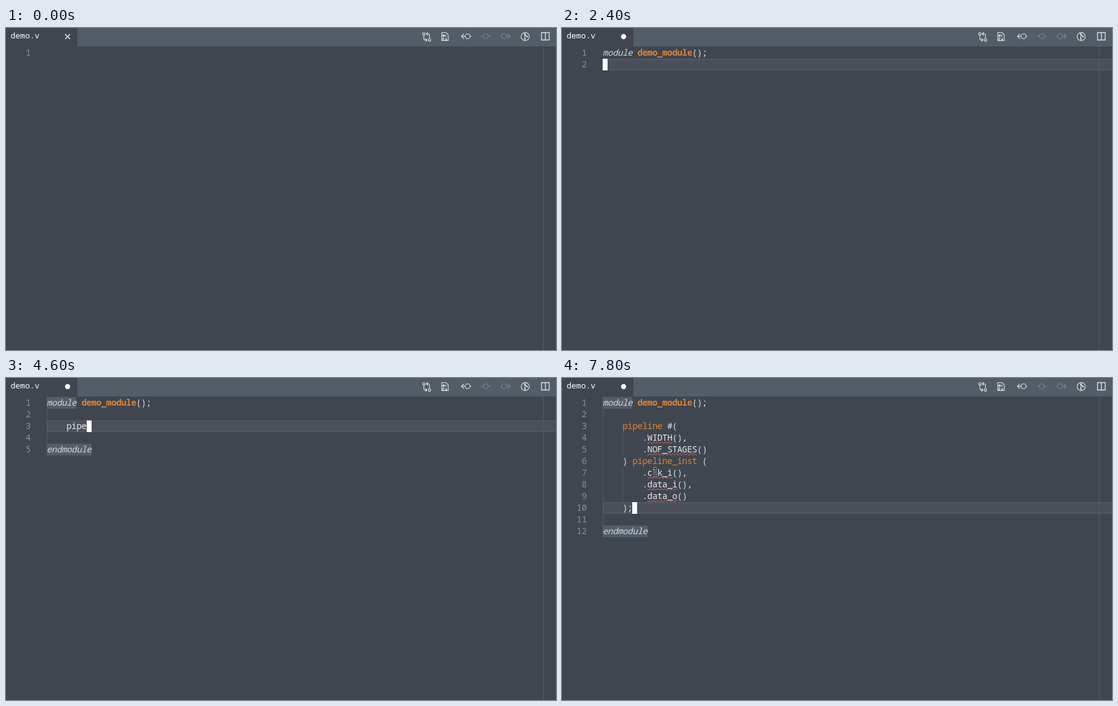
These frames come from a looping animation (893 px wide and 524 px high, 8 s). An HTML page:

```html
<!DOCTYPE html>
<html lang="en">
<head>
<meta charset="utf-8">
<title>Editor typing demo</title>
<style>
  html, body { margin: 0; width: 100%; height: 100%; overflow: hidden; background: #3f464f; }
  svg { display: block; }
  text { font: 14px "Noto Sans Mono", "DejaVu Sans Mono", monospace; fill: #e8eaec; white-space: pre; }
  .code text { letter-spacing: -.33px; }
  .code .num { fill: #8a9098; text-anchor: end; letter-spacing: -.33px; }
  .code .kw { fill: #d3d6da; font-style: italic; }
  .code .end { fill: #8fa0b3; }
  .code .name { fill: #e08534; font-weight: 700; }
  .code .inst { fill: #e08534; }
  .code .paren { fill: #d6d9dd; }
  .code .under { fill: #3f464f; }
  .code .hit { fill: #1690ee; font-weight: 700; }
  .code .rest { fill: #cfd3d8; }
  .tab { font-size: 13px; fill: #fff; }
  .head { fill: #b4b9c0; }
  .em { font-style: italic; }
  .chip { font-size: 11.66px; }
  .icon { fill: none; stroke: #e0e3e6; stroke-width: 1.1; }
  .dim { stroke: #7d8690; }
  .warn { stroke: #e0942f; }
  .err { stroke: #ea7062; }
</style>
</head>
<body>
<svg width="893" height="524" viewBox="0 0 893 524">
  <rect width="893" height="524" fill="#3f464f"/>
  <rect x="116" width="777" height="30" fill="#535d68"/>
  <text class="tab" x="7.5" y="17">demo.v</text>
  <path id="close" class="icon" style="stroke:#fff;stroke-width:1.3" d="M96 10l8 8m0-8l-8 8"/>
  <circle id="dirty" cx="100" cy="14" r="4.2" fill="#fff"/>

  <g class="icon">
    <circle cx="678.5" cy="9.5" r="2"/>
    <circle cx="687.5" cy="19.5" r="2"/>
    <path d="M678.5 11.5v6q0 2 2 2h3m-2.500-2.500l2.500 2.500-2.500 2.500M687.500 17.500v-6q0-2-2-2h-3m2.500-2.500l-2.500 2.500 2.500 2.500"/>
    <path d="M707.500 7.500h7l3.500 3.500v9.500h-10.500z"/>
    <path d="M709.500 11.500h2v2h-2zM714 11v3M709.500 16.500v3M712 17.500h1M715 16.500v2.500M709 16.500h2M713 19.500h3M709 19.500h2" stroke-width="1.300"/>
    <circle cx="749.500" cy="13.500" r="4"/>
    <path d="M745.500 13.500h-6m4-4l-4 4 4 4M753.500 13.500h2"/>
    <g class="dim">
      <circle cx="779" cy="13.500" r="4"/>
      <path d="M771 13.500h4m8 0h4"/>
      <circle cx="808.500" cy="13.500" r="4"/>
      <path d="M803 13.500h1.500m8 0h6m-4-4l4 4-4 4"/>
    </g>
    <circle cx="843" cy="14" r="6.600"/>
    <path d="M842.500 8.500v11M842.500 10.500l4 4"/>
    <g fill="#e0e3e6" stroke="none">
      <circle cx="842.500" cy="10.300" r="1.300"/>
      <circle cx="846" cy="14" r="1.300"/>
      <circle cx="842.500" cy="17.800" r="1.300"/>
    </g>
    <path d="M869.500 7.500h12.500v12h-12.500zM875.750 7.500v12" stroke-width="1.300"/>
  </g>

  <g id="code" class="code"></g>
  <path d="M872.500 30V524" stroke="#535b66"/>

  <g id="popup">
    <g class="code">
      <rect x="131" y="88" width="330" height="19" fill="#535d69"/>
      <text class="rest" x="134" y="103" style="font-size:13px">{}</text>
      <text class="hit" x="154" y="103">pipe</text>
      <text class="rest" x="186.300" y="103">line</text>
    </g>
    <rect x="461.500" y="88.500" width="329" height="169" fill="#41454f" stroke="#545d68"/>
    <path class="icon" d="M774.500 94.500l7.500 7.500m0-7.500l-7.500 7.500"/>
    <text class="head" x="467" y="107">module pipeline</text>
    <text x="467" y="142">A parametrized pipeline module.</text>
    <text x="467" y="161">You're able to configure the <tspan class="em">width</tspan></text>
    <rect x="475" y="168" width="47" height="15" rx="3" fill="#2f333b"/>
    <text x="467" y="180">(</text>
    <text class="chip" x="481" y="180">WIDTH</text>
    <text x="522" y="180">) and the <tspan class="em">number of stages</tspan></text>
    <rect x="475" y="187" width="82" height="15" rx="3" fill="#2f333b"/>
    <text x="467" y="199">(</text>
    <text class="chip" x="481" y="199">NOF_STAGES</text>
    <text x="557" y="199">)</text>
    <rect x="467" y="218" width="296" height="2" fill="#eceef0"/>
    <text x="467" y="248">File: pipeline.v</text>
  </g>

  <g id="pointer" fill="none">
    <path d="M148 146.500q3 0 3 1.500 0-1.500 3-1.500M151 148v9.500M148 159q3 0 3-1.500 0 1.500 3 1.500" stroke="#d8dadd" stroke-width="3"/>
    <path d="M148 146.500q3 0 3 1.500 0-1.500 3-1.500M151 148v9.500M148 159q3 0 3-1.500 0 1.500 3 1.500" stroke="#111" stroke-width="1.400"/>
  </g>
</svg>

<script>
const LOOP = 8000, STEP = 100, CHAR = 8.07, ROW = 19;
const HEAD = 'module demo_module();', TAIL = 'endmodule';
const HEAD_KEYS = [1, 3, 5, 6, 8, 10, 11, 12, 13, 14, 15, 17, 18];
const TAIL_KEYS = [1, 2, 3, 4, 5, 7, 8, 9];
const FILLED = [
  HEAD, '',
  '    pipeline #(',
  '        .WIDTH(),',
  '        .NOF_STAGES()',
  '    ) pipeline_inst (',
  '        .clk_i(),',
  '        .data_i(),',
  '        .data_o()',
  '    );',
  '', TAIL
];
const TOKEN = /(?<kw>\b(?:end)?module\b)|(?<end>\bend\b)|(?<name>(?<=module )\w+)|(?<inst>\bpipeline\w*)|(?<paren>[()])|(?<plain>[^\s()]+)/g;

const $ = id => document.getElementById(id);
const colX = c => 66 + c * CHAR;
const rowY = n => 31 + (n - 1) * ROW;
const show = (id, on) => { $(id).style.display = on ? '' : 'none'; };

const rect = (x, y, w, h, fill) => `<rect x="${x}" y="${y}" width="${w}" height="${h}" fill="${fill}"/>`;
const text = (x, line, str, cls) => `<text x="${x}" y="${rowY(line) + 14}" class="${cls}">${str}</text>`;
const guide = ([col, from, to]) => rect(Math.floor(colX(col)), rowY(from), 1, (to - from + 1) * ROW, '#535b66');
const mark = ([line, len]) => rect(66, rowY(line), Math.round(len * CHAR), ROW, '#535d69');

function squiggle([line, col, len, cls]) {
  const w = len * CHAR;
  const wave = 'l1.75 1.45 3 -2.7 1.25 1.25'.repeat(Math.ceil(w / 6));
  return `<svg x="${colX(col)}" y="${rowY(line) + 15.5}" width="${w}" height="3.5">` +
    `<path class="${cls}" fill="none" d="M0 1.6${wave}"/></svg>`;
}

function tokens(str, i) {
  return [...str.matchAll(TOKEN)].map(m => {
    const cls = Object.keys(m.groups).find(k => m.groups[k]);
    return text(colX(m.index), i + 1, m[0], cls);
  }).join('');
}

// Editor contents at a given step; cursor is [line, column].
function scene(s) {
  if (s < 8) return { lines: [''] };
  if (s < 21) {
    const n = HEAD_KEYS[s - 8];
    return { lines: [HEAD.slice(0, n)], cursor: [1, n] };
  }
  if (s < 24) return { lines: [HEAD.slice(0, s < 23 ? 20 : 21)], cursor: [1, s - 2] };
  if (s < 25) return { lines: [HEAD, ''], cursor: [2, 0] };
  if (s < 40) {
    const n = s < 30 ? 0 : TAIL_KEYS[Math.min(s - 30, 7)];
    return {
      lines: [HEAD, '', TAIL.slice(0, n)], cursor: [3, n],
      marks: n === 9 ? [[1, 6], [3, 9]] : []
    };
  }
  if (s < 42) return { lines: [HEAD, '', '', TAIL], cursor: [3, 0], marks: [[1, 6], [4, 9]] };
  if (s < 69) {
    const n = Math.min(s - 42, 4);
    return {
      lines: [HEAD, '', '    ' + 'pipe'.slice(0, n), '', TAIL], cursor: [3, 4 + n],
      marks: [[1, 6], [5, 9]], guides: [[0, 2, 4]],
      waves: s < 49 ? [] : [[3, 4, 4, 'warn'], [5, 0, 9, 'err']]
    };
  }
  return {
    lines: FILLED, cursor: [10, 6],
    marks: [[1, 6], [12, 9]], guides: [[0, 2, 11], [4, 4, 5], [4, 7, 9]],
    waves: s < 73
      ? [[3, 4, 4, 'warn'], [12, 0, 9, 'err']]
      : [[4, 5], [5, 10], [7, 5], [8, 6], [9, 6]].map(([line, len]) => [line, 9, len, 'err'])
  };
}

function draw(s) {
  const { lines, cursor, marks = [], guides = [], waves = [] } = scene(s);
  let out = '';
  if (cursor) {
    const y = rowY(cursor[0]);
    out += rect(66, y, 827, ROW, '#515863') + rect(68, y + 2, 825, ROW - 4, '#4a4f5a');
  }
  out += marks.map(mark).join('') + guides.map(guide).join('');
  out += lines.map((_, i) => text(40, i + 1, i + 1, 'num')).join('');
  out += lines.map(tokens).join('') + waves.map(squiggle).join('');
  if (cursor) {
    const [line, col] = cursor;
    out += rect(Math.round(colX(col)), rowY(line), 8, ROW, '#fff');
    out += text(colX(col), line, lines[line - 1][col] || '', 'under');
  }
  $('code').innerHTML = out;
  show('close', s < 8);
  show('dirty', s >= 8);
  show('popup', s >= 51 && s < 69);
  show('pointer', s >= 78);
}

let last = -1;
const start = performance.now();
function tick() {
  const s = Math.floor((performance.now() - start) % LOOP / STEP);
  if (s !== last) draw(last = s);
  requestAnimationFrame(tick);
}
tick();
</script>
</body>
</html>
```
